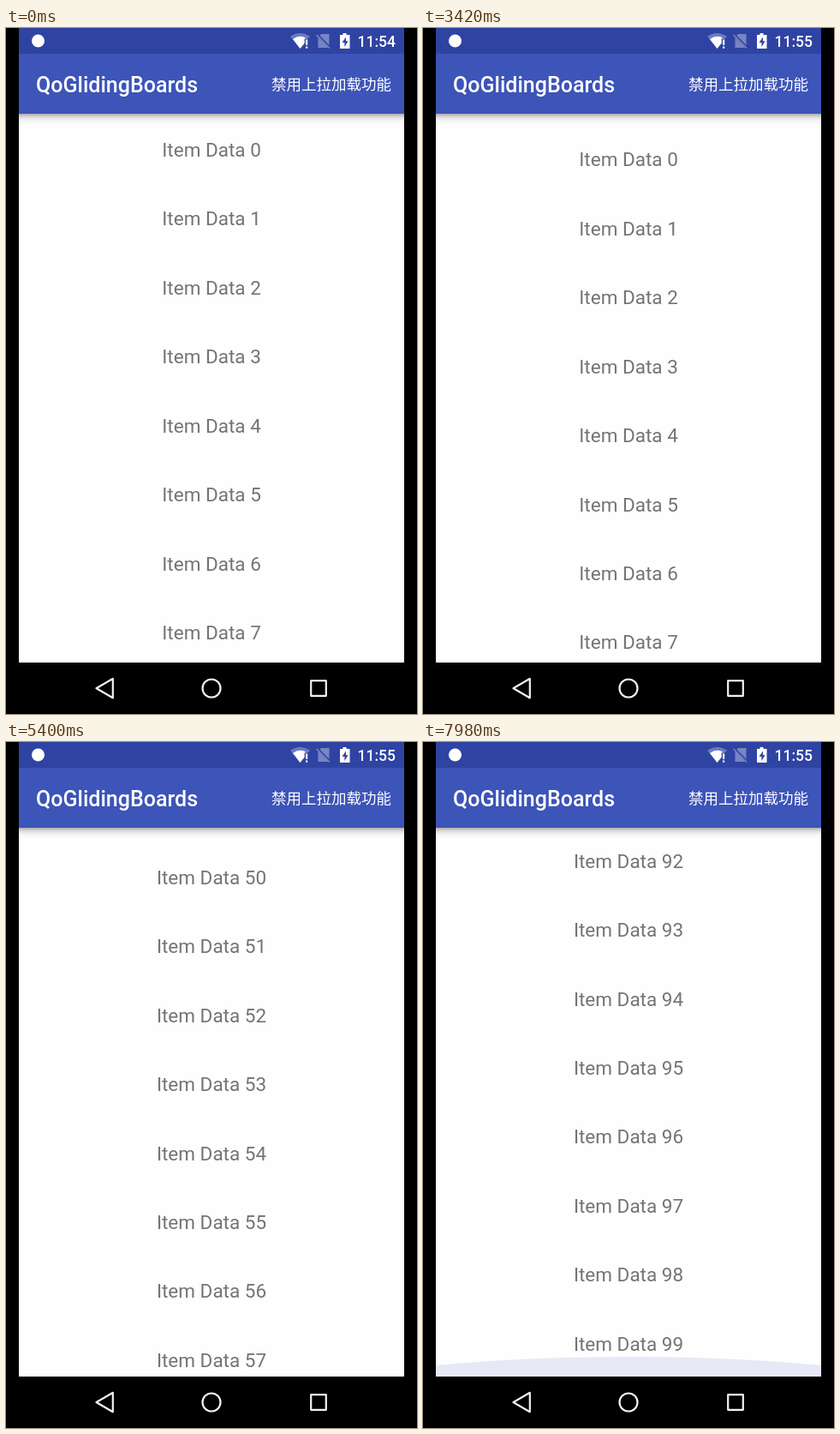
An HTML page that plays this animation: 480x800 px, repeating every 8 s.

```html
<!DOCTYPE html>
<html lang="zh-CN">
<head>
<meta charset="utf-8">
<title>Pull to refresh list</title>
<style>
  html, body { margin: 0; width: 100%; height: 100%; overflow: hidden; background: #000; }
  svg { display: block; width: 480px; height: 800px; }
  text { font-family: Roboto, "Noto Sans CJK SC", "Noto Sans CJK", sans-serif; }
  .item { font-size: 22.5px; fill: #747474; text-anchor: middle; }
  .cjk { font-family: "Noto Sans CJK SC", "Noto Sans CJK", sans-serif; font-size: 17.5px; }
  .medium { font-weight: 500; fill: #fff; }
</style>
</head>
<body>
<svg viewBox="0 0 480 800">
  <defs>
    <clipPath id="view"><rect x="15" y="100" width="450" height="640"/></clipPath>
    <linearGradient id="shade" x1="0" y1="0" x2="0" y2="1">
      <stop offset="0" stop-color="#000" stop-opacity=".32"/>
      <stop offset=".3" stop-color="#000" stop-opacity=".13"/>
      <stop offset=".6" stop-color="#000" stop-opacity=".04"/>
      <stop offset="1" stop-color="#000" stop-opacity="0"/>
    </linearGradient>
    <filter id="soft" x="-20%" y="-20%" width="140%" height="140%">
      <feGaussianBlur stdDeviation="1.5"/>
    </filter>
  </defs>
  <rect width="480" height="800"/>
  <g clip-path="url(#view)">
    <rect x="15" y="100" width="450" height="640" fill="#fefefe"/>
    <g id="header">
      <circle cx="198.5" cy="1" r="27" fill="#000" opacity=".24" filter="url(#soft)"/>
      <circle cx="198.5" r="26.5" fill="#fbf9fc"/>
      <path id="arc" fill="none" stroke="#ee2208" stroke-width="4"/>
      <text class="cjk" x="237.5" y="6.5">正在刷新</text>
    </g>
    <g id="list"></g>
    <ellipse id="glow" cx="240" rx="675" fill="#3f51b5"/>
    <rect x="15" y="100" width="450" height="13" fill="url(#shade)"/>
  </g>

  <rect x="15" width="450" height="30" fill="#2f43a3"/>
  <rect x="15" y="30" width="450" height="70" fill="#3d54b8"/>
  <text class="medium" x="35" y="75" font-size="25">QoGlidingBoards</text>
  <text class="cjk" x="310" y="72" fill="#fff">禁用上拉加载功能</text>

  <circle cx="37.5" cy="15" r="7.5" fill="#fff"/>
  <path d="M343.5 24 332 9.8Q343.5 2 355 9.8L352.6 12.6H348.6V17.8Z" fill="#fff" opacity=".3"/>
  <path d="M343.5 24 335 13Q343.5 7 351 12.3H348.6V17.8Z" fill="#fff"/>
  <path d="M350 13.5h2.2v6.5h-2.2zM350 21.6h2.2v2.2h-2.2z" fill="#fff"/>
  <g opacity=".35">
    <path d="M368 7h9.5v16h-13V11z" fill="#fff"/>
    <path d="M363 7.5 379 23.5" stroke="#2f43a3" stroke-width="3"/>
    <path d="M362.5 8 378 23.5" stroke="#fff" stroke-width="1.5"/>
  </g>
  <path d="M393.5 6h4v2h4v16h-11.5V8h3.5z" fill="#fff"/>
  <path d="M397 10.5 392.6 17h2.8v5L399.6 15.2H397z" fill="#2f43a3"/>
  <text id="clock" class="medium" x="410.5" y="21.5" font-size="17.5"></text>

  <g fill="none" stroke="#f2f2f2" stroke-width="2.2" stroke-linejoin="round">
    <path d="M105.5 770 124.8 758.8V781.2Z"/>
    <circle cx="240" cy="770" r="10.5"/>
    <rect x="356.2" y="761.2" width="17.6" height="17.6"/>
  </g>
</svg>
<script>
const LOOP = 8000, PITCH = 193 / 2.4, END = 100 * PITCH - 640;
const $ = id => document.getElementById(id);
const header = $('header'), arc = $('arc'), glow = $('glow'), clock = $('clock');

// [time, scroll offset, velocity per ms]
const SCROLL = [
  [500, 0, 0], [1150, -150, 0], [1220, -150, 0], [1560, -100, 0],
  [3200, -100, 0], [3480, 0, 0], [3600, 0, 0], [4080, 1273, 2],
  [4680, 2739.6, 1.8], [6060, 5162.6, 1.8], [7020, 7314.4, 2],
  [7065, END, 1.7], [7066, END, 0]
];
const GLOW = [[7055, 0, 0], [7140, .75, 0], [7700, 0, 0], [7770, 0, 0], [7980, .254, .0005], [8000, .26, 0]];

const rows = Array.from({ length: 10 }, () => {
  const row = document.createElementNS('http://www.w3.org/2000/svg', 'text');
  row.setAttribute('class', 'item');
  row.setAttribute('x', 240);
  $('list').append(row);
  return row;
});

// Cubic Hermite curve through timed keys
function track(keys, t) {
  if (t <= keys[0][0]) return keys[0][1];
  const k = keys.findIndex(key => key[0] > t);
  if (k < 0) return keys[keys.length - 1][1];
  const [t0, a, va] = keys[k - 1], [t1, b, vb] = keys[k];
  const h = t1 - t0, u = (t - t0) / h, w = 1 - u;
  return a + (b - a) * u * u * (3 - 2 * u) + h * u * w * (va * w - vb * u);
}

function ease(u) {
  u = Math.max(0, Math.min(1, u));
  return u * u * (3 - 2 * u);
}

function arcPath(from, to, r) {
  const point = deg => {
    const a = deg * Math.PI / 180;
    return `${198.5 + r * Math.cos(a)} ${r * Math.sin(a)}`;
  };
  return `M${point(from)}A${r} ${r} 0 ${to - from > 180 ? 1 : 0} 1 ${point(to)}`;
}

function drawHeader(t, scroll) {
  header.style.display = scroll < 0 ? '' : 'none';
  header.setAttribute('transform', `translate(0 ${50 - scroll})`);
  const turns = (t - 2460) / 1333, n = Math.floor(turns), u = turns - n;
  const base = -79 + 432 * n + 144 * u;
  arc.setAttribute('d', arcPath(base + 288 * ease(2 * u - 1), base + 20 + 288 * ease(2 * u), 11.2));
}

function drawList(scroll) {
  const first = Math.max(0, Math.floor(scroll / PITCH) - 1);
  rows.forEach((row, k) => {
    const i = first + k;
    row.textContent = i < 100 ? 'Item Data ' + i : '';
    row.setAttribute('y', 150 + PITCH * i - scroll);
  });
}

function drawGlow(scale) {
  glow.setAttribute('cy', 740 + 584.6 * scale);
  glow.setAttribute('ry', 675 * scale);
  glow.setAttribute('opacity', Math.min(.25, .48 * scale));
}

function draw(t) {
  const scroll = track(SCROLL, t);
  clock.textContent = t < 600 ? '11:54' : '11:55';
  drawHeader(t, scroll);
  drawList(scroll);
  drawGlow(Math.max(0, track(GLOW, t)));
}

const start = performance.now();
function tick() {
  draw((performance.now() - start) % LOOP);
  requestAnimationFrame(tick);
}
tick();
</script>
</body>
</html>
```
